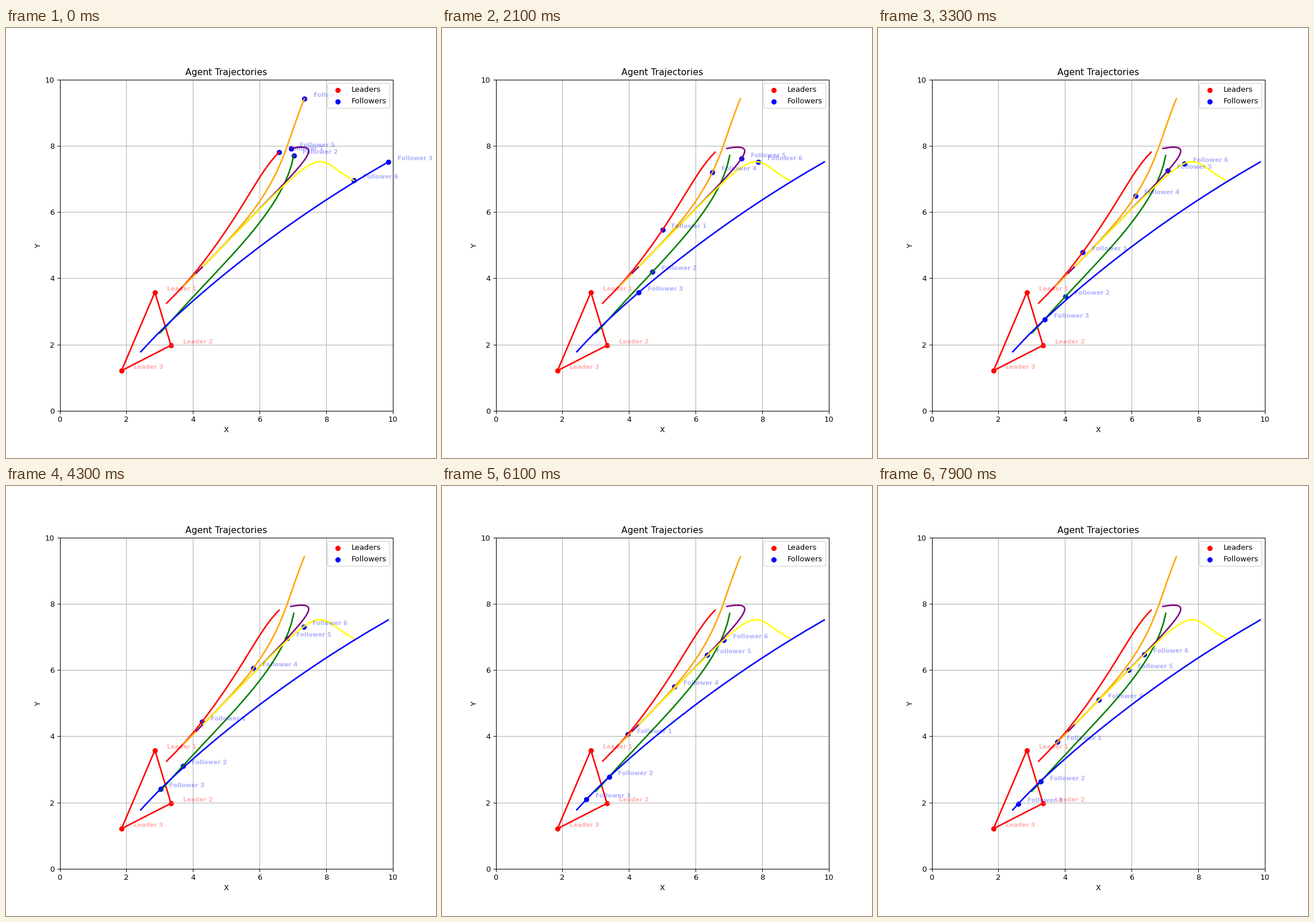
Recreate the animation shown at these times as a matplotlib script. Size 748 px wide and 748 px high, loop 8000 ms.

```python
import numpy as np
import matplotlib.pyplot as plt
from matplotlib.animation import FuncAnimation

FRAMES, STEPS, DT = 80, 200, 0.05

leaders = np.array([(2.855, 3.580), (3.338, 1.974), (1.854, 1.210)])
start = np.array([(6.581, 7.808), (7.021, 7.708), (9.858, 7.513),
                  (7.340, 9.423), (6.935, 7.921), (8.823, 6.957)])
colors = ["red", "green", "blue", "orange", "purple", "yellow"]

# Neighbours of each follower; the first three also follow one leader
neighbours = [(1, 3), (0, 2), (1,), (0, 4), (3, 5), (4,)]


def step(pos):
    """Move the followers one after another, each seeing earlier moves."""
    pos = pos.copy()
    for i, near in enumerate(neighbours):
        pull = sum(pos[j] - pos[i] for j in near)
        if i < len(leaders):
            pull = pull + leaders[i] - pos[i]
        pos[i] += DT * pull
    return pos


path = [start]
for _ in range(STEPS):
    path.append(step(path[-1]))
path = np.array(path)

fig, ax = plt.subplots(figsize=(8, 8), dpi=93.5)
ax.set(xlim=(0, 10), ylim=(0, 10), xlabel="X", ylabel="Y",
       title="Agent Trajectories")
ax.grid(True)

OFFSET = np.array([0.8, 0.1])


def add_labels(points, name, color):
    return [ax.text(*(p + OFFSET), f"{name} {i}", color=color, alpha=0.3,
                    fontsize=8, fontweight="bold", ha="center", va="center")
            for i, p in enumerate(points, 1)]


ax.scatter(*leaders.T, color="red", label="Leaders")
dots = ax.scatter(*start.T, color="blue", label="Followers")
ax.plot(*leaders[[0, 1, 2, 0]].T, color="red", lw=2)
for i, color in enumerate(colors):
    ax.plot(*path[:, i].T, color=color, lw=2)
add_labels(leaders, "Leader", "red")
tags = add_labels(start, "Follower", "blue")
ax.legend(loc="upper right")


def update(frame):
    dots.set_offsets(path[frame])
    for tag, p in zip(tags, path[frame]):
        tag.set_position(p + OFFSET)
    return [dots, *tags]


anim = FuncAnimation(fig, update, frames=FRAMES, interval=100,
                     repeat=True, repeat_delay=0, blit=False)
plt.show()
```
